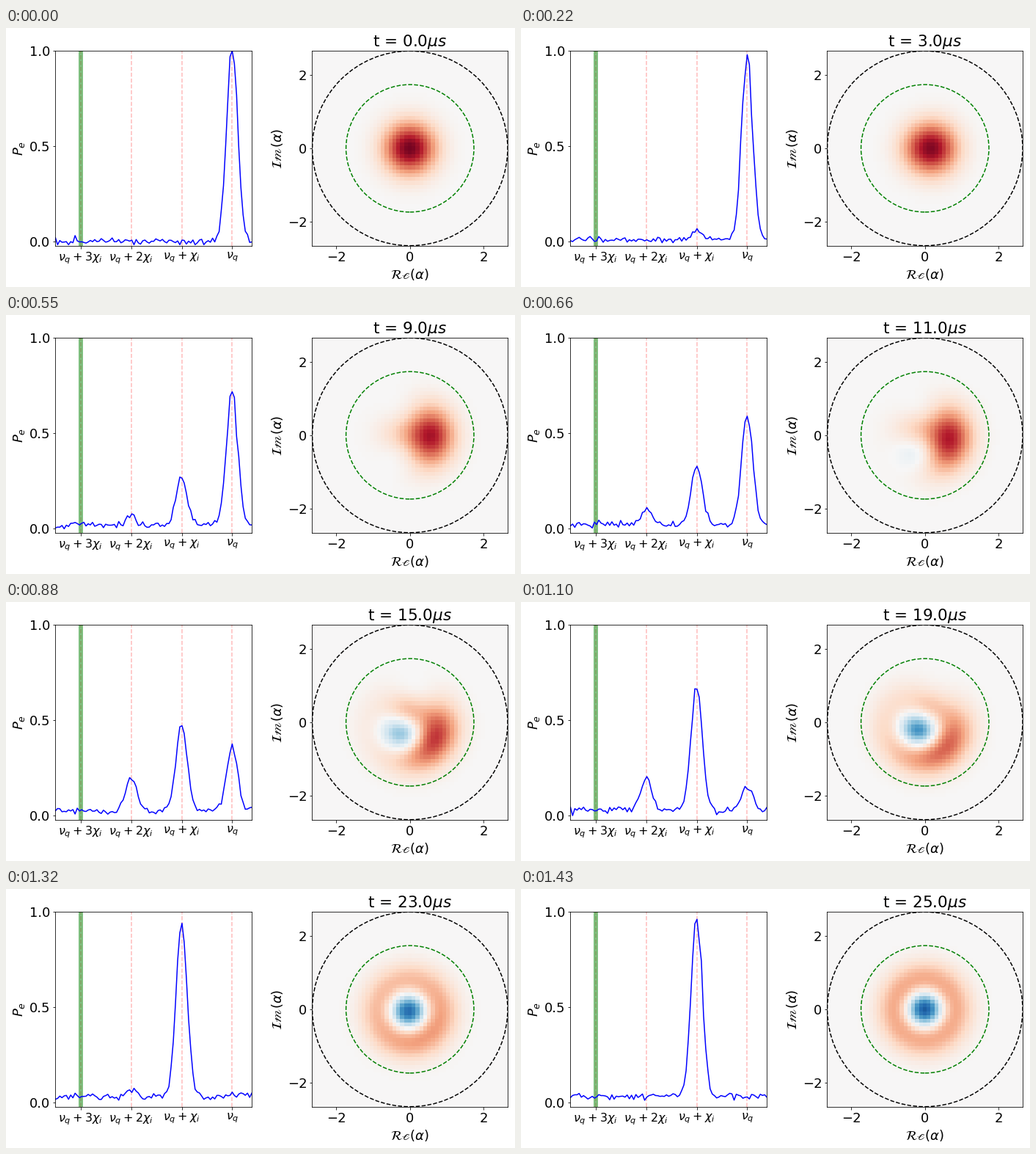
Animation of 694 by 353 pixels, one loop 2090 ms. Source, as a matplotlib script:

```python
import numpy as np
import matplotlib.pyplot as plt
from matplotlib.animation import FuncAnimation

W, H, DPI = 694, 353, 72
STEP_MS, STEPS, HOLD = 110, 14, 5
T_END = 25
LIM, CELLS = 2.65, 51

plt.rcParams.update({"font.family": "DejaVu Sans", "font.size": 18})

freq = np.linspace(3.5, -0.39, 91)
grid = np.linspace(-LIM, LIM, CELLS)
alpha = grid + 1j * grid[:, None]


def populations(s):
    """Rabi-like transfer from 0 to 1 photon with some leakage into 2."""
    p0 = np.cos(np.pi * s / 2) ** 2
    p2 = 0.2 * np.sin(np.pi * s ** 1.8) ** 2
    return p0, max(0, 1 - p0 - p2), p2


def smoothstep(x):
    x = np.clip(x, 0, 1)
    return x * x * (3 - 2 * x)


def spectrum(t, step):
    s = t / T_END
    rng = np.random.default_rng(step + 3)
    y = 0.03 * np.sqrt(s) + rng.normal(0, 0.009, freq.size)
    for n, p in enumerate(populations(s)):
        peak = np.exp(-0.5 * ((freq - n) / 0.11) ** 2)
        y += (1 - 0.06 * s) * p * peak * (1 + rng.normal(0, 0.025, freq.size))
    return np.clip(y, -0.018, 1)


def wigner(t):
    """Wigner function of a three-level state, scaled to +-1."""
    s = t / T_END
    p0, p1, p2 = populations(s)
    coherence = 0.86 * (1 - s ** 12)
    turn = np.exp(1j * np.radians(95) * smoothstep((t - 7) / 12))
    u = 4 * np.abs(alpha) ** 2
    diag = p0 + p1 * (u - 1) + p2 * (1 - 2 * u + u ** 2 / 2)
    c01 = 4 * np.sqrt(p0 * p1) * alpha.real
    c12 = np.sqrt(8 * p1 * p2) * (u - 2) * (alpha * turn).real
    c02 = np.sqrt(32 * p0 * p2) * (alpha ** 2 * turn).real
    contrast = 0.96 - 0.13 * s
    return contrast * np.exp(-u / 2) * (diag + coherence * (c01 + c12 + c02))


def add_axes(x0, x1, top=31.1, bottom=296.9):
    return fig.add_axes([x0 / W, 1 - bottom / H, (x1 - x0) / W, (bottom - top) / H])


fig = plt.figure(figsize=(W / DPI, H / DPI), dpi=DPI, facecolor="white")

left = add_axes(67.4, 335.2)
for n in range(4):
    left.axvline(n, color="r", alpha=0.27, ls="--")
left.axvline(3, color="g", alpha=0.5, lw=6)
curve, = left.plot(freq, spectrum(0, 0), "b")
left.set(xlim=(3.5, -0.39), ylim=(-0.024, 1), yticks=[0, 0.5, 1], ylabel="$P_e$")
left.set_xticks([3, 2, 1, 0],
                [r"$\nu_q+3\chi_i$", r"$\nu_q+2\chi_i$", r"$\nu_q+\chi_i$", r"$\nu_q$"],
                fontsize=16)

right = add_axes(417.4, 684.2)
image = right.imshow(wigner(0), cmap="RdBu_r", vmin=-1, vmax=1, origin="lower",
                     extent=(-LIM, LIM, -LIM, LIM), aspect="auto",
                     interpolation="nearest")
for n, color in ((3, "g"), (7, "k")):
    right.add_patch(plt.Circle((0, 0), np.sqrt(n), fill=False, ec=color, ls="--", lw=1.5))
right.set(xlim=(-LIM, LIM), ylim=(-LIM, LIM), xticks=[-2, 0, 2], yticks=[-2, 0, 2],
          xlabel=r"$\mathcal{R}\mathscr{e}(\alpha)$",
          ylabel=r"$\mathcal{I}\mathscr{m}(\alpha)$")
title = right.set_title("")


def update(i):
    step = min(i, STEPS - 1)
    t = max(0, 2 * step - 1)
    curve.set_ydata(spectrum(t, step))
    image.set_data(wigner(t))
    title.set_text(rf"t = {t:.1f}$\mu s$")
    return curve, image, title


anim = FuncAnimation(fig, update, frames=STEPS + HOLD, interval=STEP_MS,
                     repeat=True, repeat_delay=0)
plt.show()
```
